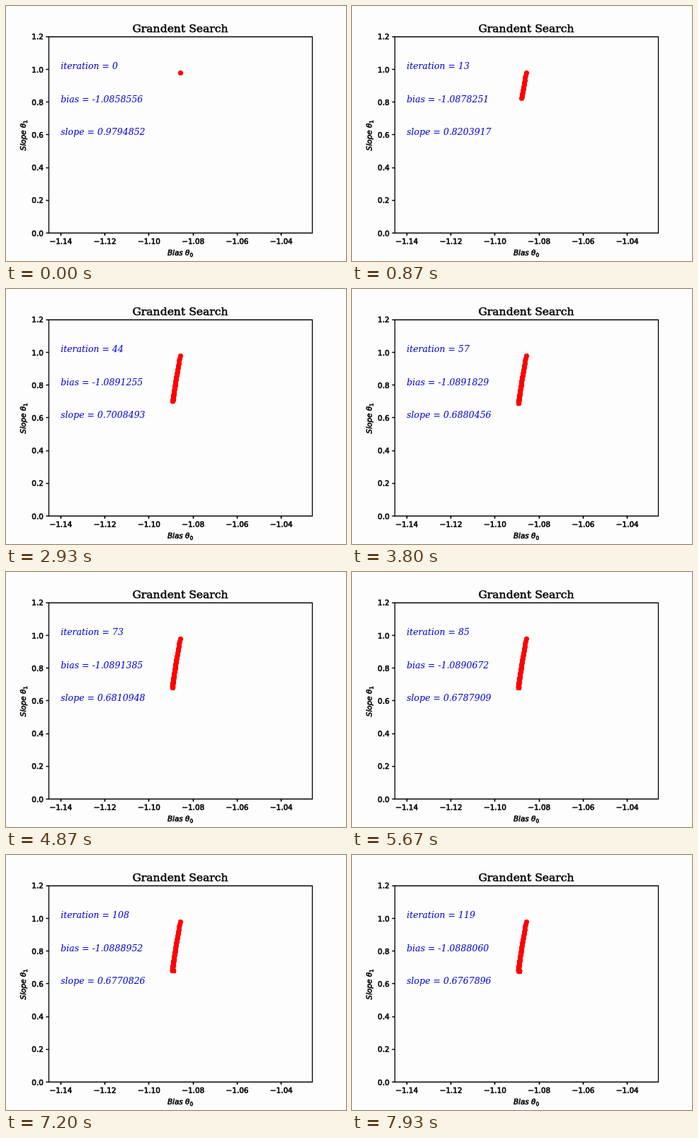
Write an HTML page that moves like this. It is 480 by 360 pixels and loops after 8000 ms.

```html
<!DOCTYPE html>
<html lang="en">
<head>
<meta charset="utf-8">
<title>Grandent Search</title>
<style>
  html, body { margin: 0; width: 100%; height: 100%; overflow: hidden; background: #fdfdfd; }
  svg { display: block; width: 480px; height: 360px; }
  text { font: 10.4px "DejaVu Sans", sans-serif; stroke: #000; stroke-width: .6px; }
  .title { font: 15.6px "DejaVu Serif", serif; stroke-width: .5px; }
  .label { font-style: italic; }
  .label .sub { font-size: 7.3px; font-style: normal; }
  .info text { font: italic 12.5px "DejaVu Serif", serif; fill: #0000d8; stroke: none; }
  .frame, .ticks { fill: none; stroke: #000; stroke-width: 1.3; }
  .ticks { stroke-width: 1.7; }
</style>
</head>
<body>
<svg id="plot" viewBox="0 0 480 360"></svg>
<script>
const LOOP = 8000, COUNT = 120;
const START = { bias: -1.085855597, slope: 0.9794852 };
const svg = document.getElementById('plot');

function add(parent, tag, attrs = {}, text = '') {
  const el = document.createElementNS('http://www.w3.org/2000/svg', tag);
  for (const key in attrs) el.setAttribute(key, attrs[key]);
  el.textContent = text;
  return parent.appendChild(el);
}

const px = bias => 246 + (bias - START.bias) * 3114;
const py = slope => 320.4 - slope * 231;
const snap = v => Math.floor(v + 1e-6) + 0.5;

// Gradient descent in closed form: a fast decay plus a slow drift.
function state(n) {
  const decay = Math.exp(-0.0572696 * n);
  const limit = 0.67647027;
  return {
    bias: START.bias - 0.00396036 * (1 - decay) + 8.4502e-6 * n,
    slope: limit + (START.slope - limit) * decay - 1.098e-7 * n
  };
}

function axisLabel(word, sub, transform) {
  const el = add(svg, 'text', { class: 'label', 'text-anchor': 'middle', transform }, word + ' θ');
  add(el, 'tspan', { class: 'sub', dy: 1.7 }, sub);
}

// Markers sit on whole pixels, which gives the trail its stepped edge.
const dots = Array.from({ length: COUNT }, (_, n) => {
  const s = state(n);
  return add(svg, 'circle', { cx: snap(px(s.bias)), cy: snap(py(s.slope)), r: 3.55, fill: '#f00' });
});

let ticks = '';
for (let i = 0; i < 6; i++) {
  const value = -1.14 + i * 0.02, x = px(value);
  ticks += `M${snap(x)} 320.5v3.7`;
  add(svg, 'text', { x, y: 335.5, 'text-anchor': 'middle' }, '−' + Math.abs(value).toFixed(2));
}
for (let i = 0; i < 7; i++) {
  const y = py(i * 0.2);
  ticks += `M60.5 ${snap(y)}h-4`;
  add(svg, 'text', { x: 52.8, y: y + 4.2, 'text-anchor': 'end' }, (i * 0.2).toFixed(1));
}
add(svg, 'path', { class: 'ticks', d: ticks });
add(svg, 'path', { class: 'frame', d: 'M60.5 43.5H432.5V320.5H60.5Z' });

add(svg, 'text', { class: 'title', x: 246, y: 36.8, 'text-anchor': 'middle' }, 'Grandent Search');
axisLabel('Bias', '0', 'translate(246 352)');
axisLabel('Slope', '1', 'translate(28 182.6) rotate(-90)');

const info = add(svg, 'g', { class: 'info' });
const lines = [1, 0.8, 0.6].map(v => add(info, 'text', { x: 77.2, y: py(v) }));

let shown = -1;
function draw(time) {
  // Steps fall on a 10 ms clock.
  const t = Math.floor(time % LOOP / 10) * 10;
  const n = Math.min(COUNT - 1, Math.floor((t + 3.34) * COUNT / LOOP));
  if (n === shown) return;
  shown = n;
  const s = state(n);
  lines[0].textContent = `iteration = ${n}`;
  lines[1].textContent = `bias = ${s.bias.toFixed(7)}`;
  lines[2].textContent = `slope = ${s.slope.toFixed(7)}`;
  dots.forEach((dot, i) => dot.setAttribute('display', i <= n ? 'inline' : 'none'));
}

function tick() {
  draw(performance.now());
  requestAnimationFrame(tick);
}
draw(0);
requestAnimationFrame(tick);
</script>
</body>
</html>
```
